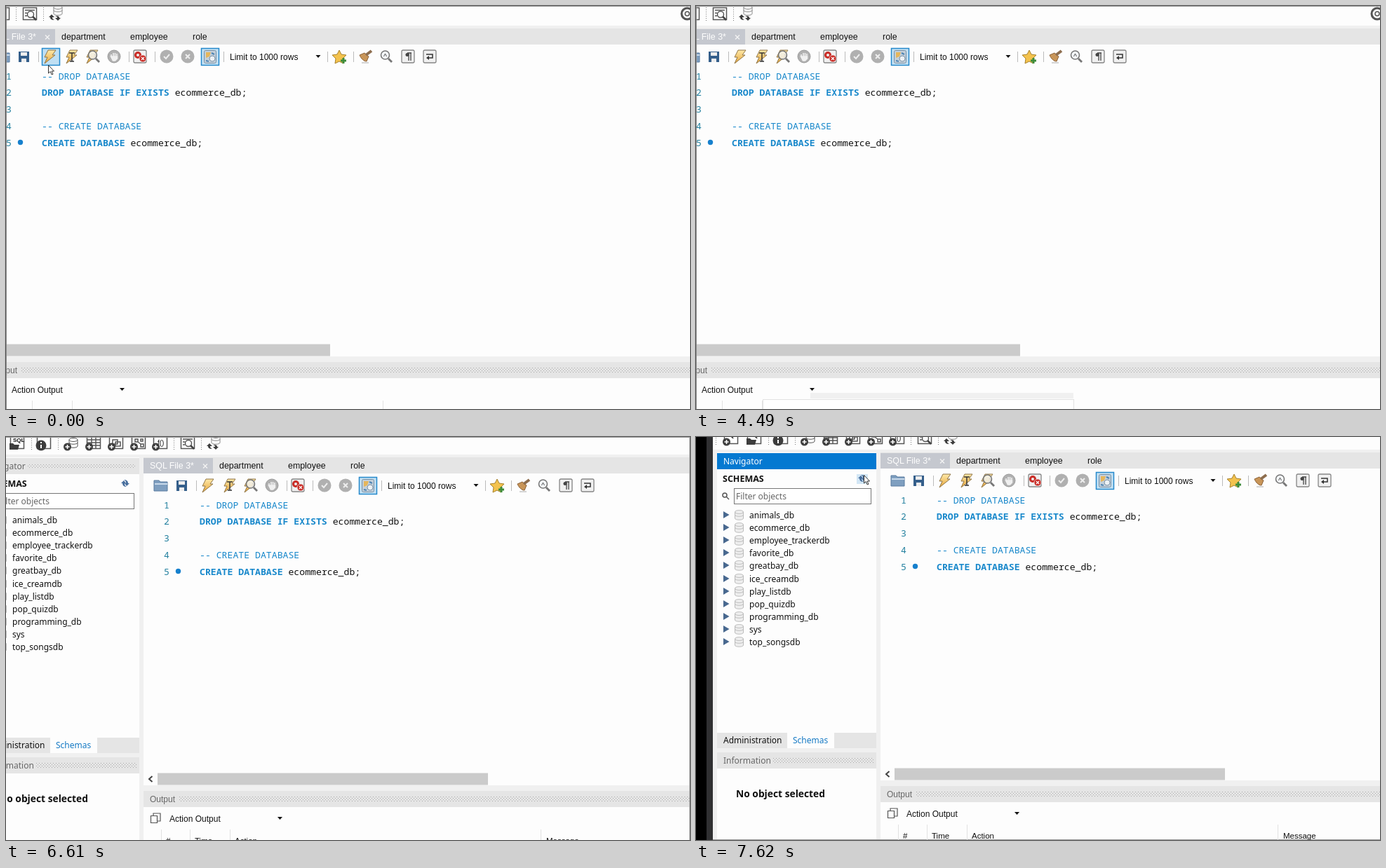
Animation of 975x575 px, one loop 8 s. Source, as an HTML page:

```html
<!DOCTYPE html>
<html lang="en">
<head>
<meta charset="utf-8">
<title>SQL editor</title>
<style>
html, body { margin: 0; width: 100%; height: 100%; overflow: hidden; background: #fdfdfd; }
svg { display: block; width: 975px; height: 575px; font: 12px "Liberation Sans", Arial, sans-serif; fill: #111; }
.anim { animation: 8s step-end infinite; }
.tabs { font-size: 12.4px; }
.side { font: 12px "Noto Sans", sans-serif; }
.code { font: 13.18px "Noto Sans Mono", monospace; }
.b { font-weight: bold; }
.sql { fill: #1888cb; }
.num { fill: #23809f; }
.muted { fill: #666; }
.white { fill: #fdfdfd; }
.line { fill: none; stroke: #555; stroke-width: 1.5; }
.sheet { fill: #fff; stroke: #555; stroke-width: 1.5; }
.band { fill: #e5e5e5; animation: flatten 8s step-end infinite; }
.gap { fill: #f0f0f0; animation: flattenGap 8s step-end infinite; }
.page { fill: #fdfdfd; animation: flattenPage 8s step-end infinite; }
.pan { animation-name: pan; }
.pointer { animation-name: point; }
.hover { animation-name: hover; }
.active { animation-name: active; }
.title { animation-name: title; }
.grip { animation-name: grip; }
.refresh { animation-name: refresh; }
.row { animation-name: row; }
.strip { animation-name: strip; }
.left { animation-name: leftEdge; }
.right { animation-name: rightEdge; }
.top { animation-name: topEdge; }
@keyframes pan {
  0% { transform: translate(-292px, 10px); }
  76.625% { transform: translate(-223px, 10px); }
  78.125% { transform: translate(-199px, 10px); }
  79.625% { transform: translate(-173px, 9px); }
  81.125% { transform: translate(-122px, 8px); }
  82.625% { transform: translate(-67px, 7px); }
  84.125% { transform: translate(-20px, 6px); }
  85.625%, 100% { transform: none; }
}
@keyframes point {
  0% { transform: translate(60px, 84px); opacity: 1; }
  3.125% { transform: translate(60px, 85px); opacity: 1; }
  12.375% { transform: translate(98px, 270px); opacity: 0; }
  88.75% { transform: translate(250px, 44px); opacity: 1; }
  90.625%, 100% { transform: translate(239px, 54px); opacity: 1; }
}
@keyframes flatten { 0% { fill: #e5e5e5; } 84.125% { fill: #fbfbfb; } 85.625%, 100% { fill: #e5e5e5; } }
@keyframes flattenGap { 0% { fill: #f0f0f0; } 84.125% { fill: #fbfbfb; } 85.625%, 100% { fill: #f0f0f0; } }
@keyframes flattenPage { 0% { fill: #fdfdfd; } 84.125% { fill: #fbfbfb; } 85.625%, 100% { fill: #fdfdfd; } }
@keyframes hover { 0% { opacity: 1; } 4.625%, 100% { opacity: 0; } }
@keyframes active { 0% { opacity: 0; } 93.75%, 100% { opacity: 1; } }
@keyframes title { 0% { fill: #666; } 93.75%, 100% { fill: #fff; } }
@keyframes grip { 0% { opacity: 1; } 93.75%, 100% { opacity: 0; } }
@keyframes refresh { 0% { opacity: 0; } 90.625%, 100% { opacity: 1; } }
@keyframes row { 0% { opacity: 0; } 43.25% { opacity: 1; } 76.625%, 100% { opacity: 0; } }
@keyframes strip { 0% { opacity: 0; } 45.125% { opacity: 1; } 76.625%, 100% { opacity: 0; } }
@keyframes leftEdge { 0% { opacity: 1; } 76.625%, 100% { opacity: 0; } }
@keyframes rightEdge { 0% { opacity: 0; } 76.625% { opacity: 1; } 85.625%, 100% { opacity: 0; } }
@keyframes topEdge { 0% { opacity: 1; } 85.625%, 100% { opacity: 0; } }
</style>
</head>
<body>
<svg viewBox="0 0 975 575">
<defs>
  <pattern id="dots" width="4" height="4" patternUnits="userSpaceOnUse">
    <path d="M0 0h1v1H0zM2 2h1v1H2z" fill="#a9a9a9"/>
  </pattern>
  <linearGradient id="gold" x2="0" y2="1"><stop stop-color="#ffe9a8"/><stop offset="1" stop-color="#e5a53a"/></linearGradient>
  <path id="bolt" d="M-3-9H8L3-2H7L-8 10l4-9h-4z" fill="url(#gold)" stroke="#8f7547"/>
  <g id="lens"><circle r="6" cx="-1.500" cy="-2" fill="#f1f5f9" fill-opacity=".75" stroke="#777" stroke-width="1.600"/><path d="M3 3l5 5" stroke="#777" stroke-width="2.800"/></g>
  <rect id="key" x="-9" y="-9" width="18" height="18" rx="2" fill="#f0f0f0" stroke="#858585" stroke-width="1.300"/>
  <path id="caret" d="M-3.500-2h7L0 2z" fill="#111"/>
  <g id="plus"><circle cx="-5.500" cy="6" r="5.500" fill="#3d3d3d"/><path d="M-8.500 6h6M-5.500 3v6" stroke="#fff" stroke-width="1.600"/></g>
  <rect id="sheet" class="sheet" x="-8.500" y="-8.500" width="19" height="17"/>
  <g id="db"><path d="M-6-4v9c0 3 12 3 12 0v-9"/><ellipse cy="-4" rx="6" ry="2.500"/><path d="M-6 0c0 3 12 3 12 0" fill="none"/></g>
</defs>

<g class="anim pan">
  <rect class="page" x="-30" y="-20" width="1320" height="620"/>
  <path class="gap" d="M23 18H1290V22H23zM23 18h7v557h-7zM257 18h6v557h-6zM30 444h227v6H30zM263 490H1290v8H263z"/>
  <path class="band" d="M263 22H1290V45H263zM30 23H257V46H30zM30 422H130v22H30zM197 422h60v22h-60zM30 450H257v23H30zM263 498H1290v23H263z"/>
  <rect x="-30" y="-20" width="45" height="620" fill="#000"/>
  <rect x="15" y="-20" width="9" height="620" fill="#303032"/>
  <rect x="24" y="574" width="1260" height="1" fill="#999"/>

  <g id="mainTools">
    <g transform="translate(120 1)"><use href="#sheet"/><circle cx="-3" cy="4" r="7.500" fill="#3d3d3d"/><path d="M-3 3v5M-3-1v2" stroke="#fff" stroke-width="2"/></g>
    <g transform="translate(82 1)"><use href="#sheet"/><text x="-5" y="-1" font-size="8" class="b">SQL</text><path d="M-10 10V1h5l2 2h7l-2 7z" fill="#3d3d3d"/></g>
    <g transform="translate(325 1)"><use href="#sheet"/><path class="line" d="M-6-5h14M-6-1h3M-6 3h3"/><circle cx="2" cy="1" r="4.500" class="sheet"/><path d="M5 4l5 5" stroke="#444" stroke-width="2.500"/></g>
    <g transform="translate(362 1)"><use href="#db" x="4" y="-5" fill="#fff" stroke="#888"/><path d="M-9 5l4-4 4 4h-3c0 2 1 3 3 4-5 0-6-2-6-4zM8 6L4 10 0 6h3c0-2-1-2-3-3 5 0 6 1 6 3z" fill="#3d3d3d"/></g>
    <circle class="line" cx="1263" cy="1" r="8" style="stroke-width:3"/><circle class="line" cx="1263" cy="1" r="3"/>
  </g>

  <g class="tabs">
    <rect x="263" y="23" width="99" height="22" fill="#c5c8cf"/>
    <text x="272" y="37.500" class="white">SQL File 3*</text>
    <path d="M348 31.500l6 6m0-6l-6 6" stroke="#f5f5f5" stroke-width="1.200"/>
    <text x="371" y="37.500">department</text>
    <text x="469" y="37.500">employee</text>
    <text x="558" y="37.500">role</text>
  </g>

  <g id="editTools">
    <path d="M278 55h7l2 2h10v13h-19z" fill="#7f9fc0" stroke="#587b9f"/><path d="M279 60h18" stroke="#c8d9ea" stroke-width="2"/>
    <path d="M310 55h15v15h-15z" fill="#355f8b"/><path d="M313 56h9v5h-9zM314 65h7v5h-7z" fill="#eee"/>
    <rect class="anim hover" x="343.500" y="50.500" width="25" height="24" fill="#bfdff3" stroke="#2489cc" stroke-width="1.500"/>
    <use href="#bolt" x="355" y="62"/>
    <use href="#bolt" x="386" y="62"/><path d="M382 57h8M386 57v12M383 69h6" stroke="#333" stroke-width="1.500"/>
    <use href="#bolt" x="415" y="62"/><use href="#lens" x="417" y="62"/>
    <circle cx="446" cy="62" r="9" fill="#b0b0b0" stroke="#999"/><path d="M442 62v-3m3 3v-5m2.500 5v-5m2.500 5v-4M441.500 62h9v3l-3 3h-3z" stroke="#f0f0f0" stroke-width="1.600" fill="#f0f0f0"/>
    <use href="#key" x="483" y="62"/><circle cx="480" cy="60" r="5" fill="#c92c26"/><circle cx="487" cy="65" r="5" fill="#c92c26" stroke="#eee" stroke-width=".7"/><circle cx="480" cy="60" r="2" fill="#eee"/><path d="M485 63l4 4m0-4l-4 4" stroke="#fff" stroke-width="1.300"/>
    <circle cx="521" cy="62" r="9.500" fill="#b0b0b0"/><path d="M517 62l3 3 5-6" fill="none" stroke="#eee" stroke-width="2"/>
    <circle cx="551" cy="62" r="9.500" fill="#b0b0b0"/><path d="M548 59l6 6m0-6l-6 6" stroke="#eee" stroke-width="2"/>
    <rect x="570.500" y="50.500" width="25" height="24" fill="#c4e1f3" stroke="#2489cc" stroke-width="1.500"/>
    <rect x="574.500" y="53.500" width="17" height="18" rx="2" fill="#c3cfda" stroke="#7890a5"/><path d="M577 56h7l-2 6-5 2z" fill="#e6b65b"/><circle cx="586" cy="65" r="4" fill="#edf1f4" stroke="#7890a5"/><path d="M577 68l4 1M585 57l4 2" stroke="#4c83b2" stroke-width="2"/>
    <text x="611" y="67">Limit to 1000 rows</text><use href="#caret" x="737" y="62"/>
    <path d="M767 53l3 6 7 1-5 5 1 7-6-3-6 3 1-7-5-5 7-1z" fill="#f3c24d" stroke="#a5812e"/><path d="M769 68h8m-4-4v8" stroke="#3d8c3a" stroke-width="3"/>
    <path d="M796 60l7-3 6 5-3 7c-4 0-8-4-10-9z" fill="#c89558" stroke="#8a6138"/><path d="M805 60l8-6" stroke="#8d6d4e" stroke-width="4"/><path d="M799 71h10" stroke="#aaa"/>
    <use href="#lens" x="834" y="62"/><path d="M830.500 62l2-4 2 4" class="line" style="stroke-width:1"/>
    <use href="#key" x="865" y="62"/><path d="M866 57v11m3-11v11M870 57h-6" stroke="#444" stroke-width="1.300"/><circle cx="864" cy="59.500" r="2.500" fill="#444"/>
    <use href="#key" x="896" y="62"/><path d="M891 59h9v5h-6" class="line" style="stroke:#333"/><path d="M891 64l4-3v6z" fill="#333"/>
  </g>

  <g class="code" id="code">
    <g class="sql">
      <text x="343" y="94.500">-- DROP DATABASE</text>
      <text x="343" y="118.250"><tspan class="b">DROP DATABASE IF EXISTS</tspan><tspan fill="#111"> ecommerce_db;</tspan></text>
      <text x="343" y="165.750">-- CREATE DATABASE</text>
      <text x="343" y="189.500"><tspan class="b">CREATE DATABASE</tspan><tspan fill="#111"> ecommerce_db;</tspan></text>
    </g>
    <circle cx="312.500" cy="184.500" r="3.700" fill="#1680cd"/>
  </g>
  <rect x="283" y="472.500" width="471" height="17" fill="#cbcbcb"/>
  <path d="M275.500 477l-4.500 4 4.500 4" fill="none" stroke="#444" stroke-width="2"/>

  <text x="272" y="514" class="muted">Output</text>
  <rect x="313" y="506" width="970" height="7" fill="url(#dots)"/>
  <g class="line" style="stroke-width:1.2"><path d="M277 534v-4h10v11h-4"/><path d="M273.500 533.500h9v10h-9z"/></g>
  <text x="300" y="542">Action Output</text><use href="#caret" x="457.500" y="537"/>
  <path d="M288.500 553v22M329.500 553v22M386.500 553v22M829.500 553v22" stroke="#e2e2e2"/>
  <g style="font-size:11.500px"><text x="295" y="573">#</text><text x="336" y="573">Time</text><text x="393" y="573">Action</text><text x="837" y="573">Message</text></g>

  <g class="side" id="side">
    <rect class="anim active" x="30" y="23" width="227" height="23" fill="#0479d1"/>
    <text x="39" y="39" class="anim title">Navigator</text>
    <rect x="98" y="31" width="154" height="7" fill="url(#dots)" class="anim grip"/>
    <text x="38" y="63.500" class="b" style="font-size:12.500px">SCHEMAS</text>
    <rect class="anim refresh" x="229" y="53" width="16" height="14" fill="#d2e6f5"/>
    <path d="M231 59l4-4 3 4h-2c0 3 1 4 3 5-4 0-6-2-6-5zM243 59l-4 4-3-4h2c0-3-1-4-3-5 4 0 6 2 6 5z" fill="#486f9e"/>
    <circle cx="41" cy="83" r="3" class="line"/><path d="M43 85l4 4" class="line"/>
    <rect x="54.500" y="73.500" width="195" height="22" fill="#fff" stroke="#777"/>
    <text x="57" y="88.500" class="muted">Filter objects</text>
    <text x="39" y="437">Administration</text>
    <text x="138" y="437" fill="#1479c4">Schemas</text>
    <text x="39" y="466" class="muted">Information</text>
    <rect x="109" y="458" width="144" height="7" fill="url(#dots)"/>
    <text x="57" y="513.500" class="b" style="font-size:13.800px">No object selected</text>
  </g>
</g>

<rect class="anim row" x="95.500" y="561.500" width="443" height="18" fill="#fff" stroke="#e2e2e2"/>
<rect class="anim strip" x="163" y="552" width="375" height="8" fill="#f0f0f0"/>
<rect class="anim left" width="1" height="575" fill="#888"/>
<rect class="anim right" x="974" width="1" height="575" fill="#999"/>
<rect class="anim top" width="975" height="1" fill="#999"/>
<path class="anim pointer" d="M.5.5v11.500l2.700-2.500 2 4.500 1.800-.8-2-4.200h3.500z" fill="#fff" stroke="#333"/>
</svg>
<script>
const add = (id, markup) => document.getElementById(id).insertAdjacentHTML("beforeend", markup);

const schemas = "animals_db ecommerce_db employee_trackerdb favorite_db greatbay_db ice_creamdb play_listdb pop_quizdb programming_db sys top_songsdb";
schemas.split(" ").forEach((name, i) => {
  const y = Math.round(111 + 18.1 * i);
  add("side", `<path d="M39 ${y - 5}l8.500 5-8.500 5z" fill="#48688f"/>
    <use href="#db" x="61.500" y="${y}" fill="#eee" stroke="#bbb"/><text x="76" y="${y + 4.5}">${name}</text>`);
});

for (let n = 0; n < 5; n++) add("code", `<text class="num" x="292" y="${94.5 + 23.75 * n}">${n + 1}</text>`);

for (const x of [338, 467, 504, 602, 750, 787])
  add("editTools", `<rect x="${x}" y="55" width="1" height="15" fill="#bbb"/>`);

for (const x of [28, 103, 141, 306, 345])
  add("mainTools", `<path d="M${x}.500-8v19" stroke="#777" stroke-dasharray="1 2"/>`);

const glyphs = {
  49: '<text x="-6" y="-1" font-size="8" class="b">SQL</text>',
  160: '<use href="#db" x="3" fill="#fff" stroke="#555"/>',
  191: '<path class="line" d="M-8-4h18M-8 0h18M-8 4h18M-2-8V9M4-8V9"/>',
  223: '<path class="line" d="M-4-4h7v6h-7zM0-1h7v6H0z"/>',
  255: '<path class="line" d="M-4-5h4v4h-4zM4-5h3v3H4zM4 2h4v4H4zM0-1l4 3"/>',
  286: '<text x="-3" y="4" font-size="10">f()</text>'
};
for (const [x, glyph] of Object.entries(glyphs)) {
  const frame = x === "160" ? "" : '<use href="#sheet"/>';
  add("mainTools", `<g transform="translate(${x} 1)">${frame}${glyph}<use href="#plus"/></g>`);
}
</script>
</body>
</html>
```
